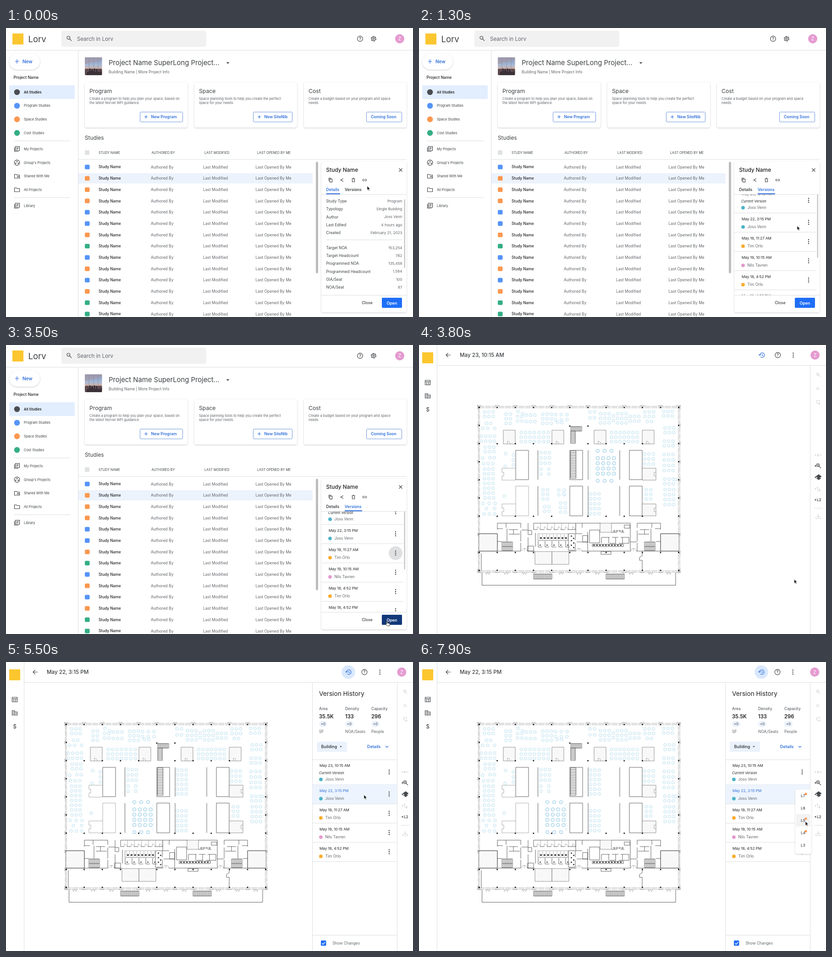
These frames come from a looping animation (888x631 px, 8 s). An HTML page:

```html
<!DOCTYPE html>
<html lang="en">
<head>
<meta charset="utf-8">
<title>Version history</title>
<style>
  html, body { margin: 0; width: 888px; height: 631px; overflow: hidden; background: #fff; }
  svg { display: block; }
  text { font-family: Inter, Roboto, sans-serif; fill: #3c4043; white-space: pre; }
  .m { font-weight: 500; }
  .b { font-weight: 600; }
  .k { fill: #202124; }
  .g { fill: #5f6368; }
  .blue { fill: #2f6fdc; }
  .white { fill: #fff; }
  .mid { text-anchor: middle; }
  .end { text-anchor: end; }
  .it { font-style: italic; }
  .ic { fill: none; stroke: #44474a; stroke-width: 1.2; }
  .pale { stroke: #d3d5d7; }
  .ib { stroke: #2f6fdc; }
  .ln { fill: none; stroke: #dcdee0; }
  .lift { filter: drop-shadow(0 1px 1.5px rgba(60, 64, 67, .28)); }
  .wall { fill: none; stroke: #3a3a3a; stroke-width: .8; }
  .thin { fill: none; stroke: #777; stroke-width: .6; }
  .room { fill: #f8f8f8; stroke: #666; stroke-width: .7; }
  .desk { fill: #f4fafd; stroke: #acd8ea; stroke-width: .7; }
  .moved { fill: #f0f8fc; stroke: #80bfdd; stroke-width: .85; }
  .ghost { fill: none; stroke: #c6e2ef; stroke-width: .7; }
  .cursor { animation: travel 8s ease-in-out infinite; }
  .scroll { animation: scroll 8s linear infinite; }
  .nudge { animation: nudge 8s step-end infinite; }
  @keyframes travel {
    0%, 1% { transform: translate(788px, 345px); }
    4%, 7% { transform: translate(760px, 353px); }
    12%, 17% { transform: translate(825px, 432px); }
    21%, 24% { transform: translate(849px, 452px); }
    27.2%, 35% { transform: translate(809px, 459px); }
    41.5%, 46% { transform: translate(830px, 603px); }
    51.5%, 57% { transform: translate(757px, 20px); }
    66.5%, 83.5% { transform: translate(781px, 290px); }
    91.5%, 94% { transform: translate(867px, 337px); }
    98.5%, 100% { transform: translate(843px, 348px); }
  }
  @keyframes scroll {
    0%, 12.5% { transform: translateY(0); }
    16.25% { transform: translateY(-22px); }
    18.75%, 100% { transform: translateY(-34px); }
  }
  @keyframes nudge {
    0% { transform: translateX(.8px); }
    68.75% { transform: none; }
  }
</style>
</head>
<body>
<script>
let rules = '';

// Visible from the 1st to the 2nd time, 3rd to 4th, and so on (ms).
function span(...times) {
  const id = 's' + times.join('_');
  const keys = times.map((ms, i) => `${ms / 80}%{opacity:${1 - i % 2}}`).join('');
  rules += `@keyframes ${id}{${times[0] ? '0%{opacity:0}' : ''}${keys}}`;
  return `style="animation:${id} 8s step-end infinite"`;
}

const loop = (n, fn) => Array.from({ length: n }, (_, i) => fn(i)).join('');
const text = (x, y, size, str, cls = '') =>
  `<text x="${x}" y="${y + size * .36}" font-size="${size}" class="${cls}">${str}</text>`;
const rect = (x, y, w, h, fill, rx = 0, more = '') =>
  `<rect x="${x}" y="${y}" width="${w}" height="${h}" rx="${rx}" fill="${fill}" ${more}/>`;
const dot = (x, y, r, fill) => `<circle cx="${x}" cy="${y}" r="${r}" fill="${fill}"/>`;
const path = (d, cls, more = '') => `<path d="${d}" class="${cls}" ${more}/>`;
const group = (body, attrs = '') => `<g ${attrs}>${body}</g>`;
const icon = (x, y, d, cls = '') => path(d, 'ic ' + cls, `transform="translate(${x} ${y})"`);
const kebab = (x, y) => loop(3, i => dot(x, y - 4.2 + i * 4.2, 1.25, '#44474a'));
const caret = (x, y, s = 3.5) => `<path d="M${x - s} ${y - s / 2}h${2 * s}l${-s} ${s}z" fill="#44474a"/>`;
const ring = r => `M${-r} 0a${r} ${r} 0 1 0 ${2 * r} 0a${r} ${r} 0 1 0 ${-2 * r} 0`;

const plus = 'M-4.5 0h9M0-4.5v9';
const lens = 'M1.2 1.2L5 5M-5-1.7a3.3 3.3 0 1 0 6.6 0a3.3 3.3 0 1 0-6.6 0';
const books = 'M-3.5-5.5h9v9h-9zM-5.5-3.5v9h9M-1.5-3h5M-1.5-1h5M-1.5 1h3';
const folder = 'M-5.5-4h4l1.5 1.5h5.5v7h-11z';
const yellow = '#fcc62f', pink = '#e59ad0', blue = '#5594f9', orange = '#fb9850', green = '#34ae84';
const help = (x, y) => icon(x, y, ring(5.8)) + text(x, y, 8.5, '?', 'mid b');
const avatar = (x, y) => dot(x, y, 10, pink) + text(x, y, 11, 'Z', 'mid white');

const joss = ['Joss Venn', '#4db3c9'], tim = ['Tim Orlo', '#fbab2c'], nils = ['Nils Tavren', pink];
const versions = [
  ['May 23, 10:15 AM', joss], ['May 22, 3:15 PM', joss], ['May 19, 11:27 AM', tim],
  ['May 19, 10:15 AM', nils], ['May 18, 4:52 PM', tim], ['May 18, 4:52 PM', tim]
];

function versionList(x, top, left, right, menuX, count, picked) {
  return loop(count, i => {
    const [date, [name, color]] = versions[i];
    const y = top + i * 42 + (i ? 12.3 : 0), extra = i ? 0 : 12.3, on = i === picked;
    return (on ? rect(left, y, right - left, 42 + extra, '#edf4fd') : '') +
      text(x, y + 13, 8.1, date, on ? 'blue' : 'k') +
      (i ? '' : text(x - 1, y + 29, 7.4, 'Current Version', on ? 'it blue' : 'it k')) +
      dot(x + 3, y + 30.5 + extra, 3.9, color) +
      text(x + 12.5, y + 30.5 + extra, 8.4, name, 'g') + kebab(menuX, y + 20.5 + extra / 2) +
      path(`M${left} ${y + 42 + extra}H${right}`, 'ln');
  });
}

function sidebar() {
  const studies = [['All', '#4a4d52'], ['Program', blue], ['Space', orange], ['Cost', green]];
  const links = [
    ['My Projects', 264, books],
    ["Group's Projects", 294, ring(5.8) + 'M-3.5 1.6a.8 .8 0 1 0 1.6 0a.8 .8 0 1 0-1.6 0M2 1.6a.8 .8 0 1 0 1.6 0a.8 .8 0 1 0-1.6 0M-.8-2.4a.8 .8 0 1 0 1.6 0a.8 .8 0 1 0-1.6 0'],
    ['Shared With Me', 323.5, folder + 'M0 2.7q.5-1.5 2.3-1.5t2.3 1.5M1.4-.4h1.8'],
    ['All Projects', 353, folder], ['Library', 388, books]
  ];
  return group(rect(7, 56, 67, 35, '#fff', 17.5), 'class="lift"') + icon(24, 73, plus, 'ib') +
    text(36, 73, 9.9, 'New', 'b blue') + text(16.5, 108, 8.5, 'Project Name', 'm k') +
    rect(7, 125, 143, 30, '#e2eefd', 2) +
    loop(4, i => dot(24, 140 + i * 29.7, 6.3, studies[i][1]) +
      text(39, 140 + i * 29.7, i ? 7.4 : 7.5, studies[i][0] + ' Studies', i ? '' : 'b k')) +
    links.map(([label, y, d]) => icon(24, y, d) + text(39, y, 7.4, label)).join('') +
    path('M17 246.5H140.5M17 370.5H140.5M157.5 48V631', 'ln');
}

function card(x, title, line1, line2, label, w, hasPlus) {
  const bx = x + 214 - w;
  return group(rect(x, 118.5, 224, 99, '#fff', 4), 'class="lift"') + text(x + 10, 138, 12.2, title) +
    text(x + 10, 154, 7.42, line1, 'g') + text(x + 10, 163.5, 7.42, line2, 'g') +
    rect(bx + .5, 183.5, w - 1, 21.5, '#fff', 2, 'stroke="#6d97dc"') +
    (hasPlus ? icon(bx + 13.5, 194, 'M-3.5 0h7M0-3.5v7', 'ib') : '') +
    text(bx + (hasPlus ? 24.5 : 10), 194.3, 8.6, label, 'b blue');
}

function photo() {
  return rect(172, 64, 37.5, 39, 'url(#dusk)', 2) + rect(172, 89, 37.5, 14, '#5d4a50', 2) +
    path('M172 64h37.5v5L172 79z', '', 'fill="#a99aa8" opacity=".7"') +
    path('M181 64v27M191 64v27M201 64v27', '', 'stroke="#8891a8" stroke-width=".8"') +
    path('M176 97q8-5 16-2t17-1v9h-33z', '', 'fill="#3c3138"') +
    loop(4, i => rect(182 + i * 5, 88 + i % 2 * 2, 2, 7, '#2b2830', 1));
}

function table() {
  const kinds = 'booobbogbobogg', fills = { b: blue, o: orange, g: green };
  const heads = [[202, 'STUDY NAME'], [317.5, 'AUTHORED BY'], [433, 'LAST MODIFIED'], [548, 'LAST OPENED BY ME']];
  return text(172, 240, 11.8, 'Studies') + rect(172, 267, 10, 10, '#e0e1e3', 2) +
    heads.map(([x, s]) => text(x, 272, 7.1, s)).join('') +
    path('M158 287H874', 'ln') + rect(158, 317, 511, 22.5, '#edf3fc') +
    loop(14, i => {
      const y = 303.5 + i * 24.69;
      return rect(172, y - 5, 10.5, 10, fills[kinds[i]], 2.5) + text(202, y, 8.3, 'Study Name', 'm k') +
        text(316, y, 8.45, 'Authored By', 'g') + text(430, y, 8.45, 'Last Modified', 'g') +
        text(544.5, y, 8.45, 'Last Opened By Me', 'g');
    }) + rect(676, 292, 5, 243.5, '#bdbdbd', 2.5);
}

function studyPanel() {
  const rows = [
    ['Study Type', 'Program'], ['Typology', 'Single Building'], ['Author', joss[0]],
    ['Last Edited', '4 hours ago'], ['Created', 'February 21, 2023'],
    ['Target NOA', '153,254'], ['Target Headcount', '782'], ['Programmed NOA', '135,458'],
    ['Programmed Headcount', '1,584'], ['GIA/Seat', '100'], ['NOA/Seat', '87']
  ];
  const bar = rect(868.5, 374, 2.5, 150, '#c6c8ca', 1.2);
  const tab = (x, w, s, times, off) =>
    group(text(x, 353, 8.7, s, 'b blue') + rect(x, 361, w, 2.2, '#2f6fdc'), span(...times)) +
    group(text(x, 353, 8.7, s, 'b'), span(...off));
  const details = rows.map(([a, b], i) => {
    const y = 378 + i * 17.25 + (i > 4 ? 15.5 : 0);
    return text(698.5, y, 8.4, a) + text(864.5, y, 8.1, b, 'end g');
  }).join('') + path('M698 462.5H865', 'ln') + bar;
  const list = group(dot(850, 454.5, 15, '#dfe0e2'), span(1650, 3600)) +
    group(versionList(704, 371.5, 688, 867, 850, 6, -1) + bar, 'class="scroll"');
  return group(rect(688, 292, 186, 329, '#fff', 4), 'class="lift"') +
    text(698.5, 310, 11.9, 'Study Name', 'm k') + icon(861, 310, 'M-3.5-3.5l7 7M3.5-3.5l-7 7') +
    icon(708, 332, 'M-1.5-2.2h5v6.5h-5zM-3.5 2v-6.2h5') +
    icon(733, 332, 'M2.5-3L-2.7 0L2.5 3M2-3h1M2 3h1M-3 0h.6') +
    icon(758, 332, 'M-2.5-2v6h5v-6M-3.5-3.2h7M-1-4.2h2') +
    icon(782.5, 332, 'M-1-2h-1a2 2 0 0 0 0 4h1M1-2h1a2 2 0 0 1 0 4h-1M-1.5 0h3') +
    tab(698.5, 30.5, 'Details', [0, 400], [400, 3600]) + tab(739, 38, 'Versions', [400, 3600], [0, 400]) +
    path('M688 363.5H874M688 583.5H874', 'ln') +
    group(group(details, span(0, 400)) + group(list, span(400, 3600)), 'clip-path="url(#body)"') +
    text(788, 600.3, 8.7, 'Close', 'mid m') + rect(820, 589, 44, 22, '#1f6ef7', 2) +
    group(rect(820, 589, 44, 22, '#12387a', 2), span(3300, 3600)) + text(842, 600.3, 8.9, 'Open', 'mid b white');
}

function contextMenu() {
  const items = ['Restore this Version', 'Name this Version', 'Make a Copy of this Version'];
  return group(
    group(rect(681, 420, 160, 99, '#fff', 4), 'class="lift"') +
    group(rect(681, 454, 160, 30, '#f4f4f5'), span(2000, 2800)) +
    items.map((s, i) => text(691.5, 440 + i * 29.6, 8.33, s, 'g')).join(''), span(1800, 2800));
}

function studiesScreen() {
  return rect(14, 12, 24, 24, yellow) + text(48.5, 24, 18.5, 'Lorv') +
    rect(121, 6, 316, 35, '#f1f1f2', 4) + icon(138, 23, lens) + text(155, 24, 11.55, 'Search in Lorv', 'g') +
    help(772.5, 23.5) + icon(802, 23.5, ring(1.8) + ring(4.4)) +
    `<circle cx="802" cy="23.5" r="5.4" class="ic" stroke-dasharray="2.6 3.05"/>` + avatar(859, 23.5) +
    path('M0 48.5H888', 'ln') + sidebar() + photo() +
    text(224, 76, 14.8, 'Project Name SuperLong Project...') + caret(484, 76.5) +
    text(224, 96, 8.36, 'Building Name | More Project Info', 'g') +
    card(172, 'Program', 'Create a program to help you plan your space, based on', 'the latest Norvel WPI guidance.', 'New Program', 94, true) +
    card(411, 'Space', 'Space planning tools to help you create the perfect', 'space for your needs.', 'New SiteNib', 86, true) +
    card(650, 'Cost', 'Create a budget based on your program and space', 'needs.', 'Coming Soon', 78, false) +
    table() + studyPanel() + contextMenu();
}

const desks = (x, y, cols, rows, dx = 9.4, dy = 10, r = 3.3, cls = 'desk') =>
  loop(cols * rows, i => `<circle cx="${x + i % cols * dx}" cy="${y + Math.floor(i / cols) * dy}" r="${r}" class="${cls}"/>`);

// A block of moved seats with a row of three above and below.
const movedBlock = (x, y) => desks(x, y, 4, 4, 11.8, 11.3, 3.8, 'moved') +
  desks(x, y - 16, 3, 2, 15, 65.5, 3.6, 'moved');
const halves = (x, y, n) => loop(n, i => path(`M${x} ${y + i * 10.4}a3.3 3.3 0 0 0 0 6.6`, 'ghost'));

function seats() {
  const west = desks(143, 146, 3, 2) + desks(147, 171, 2, 1) + desks(139, 182, 2, 1, 11) + desks(165, 182, 1, 1) +
    desks(136, 199, 4, 2, 9.6, 11) + desks(144.5, 223, 3, 2) + desks(139, 247, 1, 1) + desks(155, 246, 2, 1) +
    desks(141, 259, 3, 1, 10) + desks(143, 271, 3, 6, 9.3, 10.4) + desks(144, 334, 3, 1) +
    desks(140, 346, 3, 1, 13) + desks(147, 357, 2, 1, 18) + desks(142, 369, 3, 1, 11.5);
  const north = desks(190, 151, 2, 3) + desks(216, 145, 1, 1) + desks(215, 156, 2, 2) + desks(226, 150, 1, 1) +
    desks(234, 153, 3, 2, 9.4, 14) + desks(270, 151, 3, 3) + desks(298, 152, 3, 2, 12.5, 11) + desks(302, 169, 2, 1) +
    desks(223, 191, 4, 3, 9.6) + desks(262, 191, 3, 3, 10) +
    desks(373, 146, 2, 2, 10, 13) + desks(396, 150, 3, 3) + desks(424, 155, 1, 2) + desks(433, 150, 3, 3) +
    desks(461, 156, 3, 2) + desks(493, 146, 3, 2) + desks(498, 167, 2, 1) +
    desks(420, 191, 3, 3) + desks(448, 191, 4, 3);
  const east = desks(534, 145, 3, 2) + desks(537, 181, 3, 2) + desks(535, 210, 3, 2, 9.6) + desks(535, 239, 3, 2, 9.6, 12) +
    desks(535, 263, 3, 2, 9.6, 11) + desks(536, 293, 3, 2) + desks(560, 294, 1, 1) + desks(537, 316, 3, 4, 9.3, 10.8);
  const core = desks(189, 237, 1, 1) + desks(206, 240, 1, 3, 0, 11) + desks(188, 265, 1, 1) + desks(186, 330, 1, 1) +
    desks(266, 235, 3, 3, 9.3, 11.5) + desks(266, 271, 2, 2, 17, 11) + desks(492, 238, 3, 3, 9.6, 11) +
    desks(496, 316, 2, 3, 9.6) + desks(374, 325, 3, 5, 9.4, 10.8);
  return west + north + east + core;
}

const seatsBefore = () => movedBlock(390, 247) + halves(375, 233, 6) +
  desks(270.5, 316, 2, 3, 10) + desks(274, 353, 2, 2) + desks(305, 317, 2, 2, 12, 10) + desks(316, 325, 1, 1) +
  desks(309, 345, 2, 3, 10);
const seatsAfter = () => movedBlock(280, 322) + halves(323, 310, 6) + desks(374, 236, 3, 6, 9.6, 10.4);

const stairs = (x, y, w, h, n, upright) => path(`M${x} ${y}h${w}v${h}h${-w}z` +
  loop(n, i => upright ? `M${x} ${y + (i + 1) * h / (n + 1)}h${w}` : `M${x + (i + 1) * w / (n + 1)} ${y}v${h}`), 'wall');

function floor() {
  const cx = i => 131 + i * 39.6, cy = i => 136 + i * 39.6;
  const post = (x, y) => rect(x - 1.4, y - 1.4, 2.8, 2.8, '#222');
  const inner = [1, 2, 3, 4, 6, 7, 8, 9];
  const box = (x, y, w, h, cls) => path(`M${x} ${y}h${w}v${h}h${-w}z`, cls);
  const edge = loop(12, i => post(cx(i), 136.5) + post(cx(i), 492) + post(cx(i), 453) +
      path(`M${cx(i) - 4} 134v-2h8v2M${cx(i) - 4} 495v2h8v-2`, 'thin')) +
    loop(10, i => post(131.5, cy(i)) + post(566.5, cy(i)) +
      path(`M129.5 ${cy(i) - 3}h-1.5v6h1.5M568.5 ${cy(i) - 3}h1.5v6h-1.5`, 'thin'));
  const cores = [211, 329, 459].map(x => box(x, 230, 28, 64, 'wall') +
    box(x, 308, 28, 65, x === 211 ? 'thin' : 'wall')).join('');
  const cabins = [184, 290, 382, 487].map(x => box(x, 186, 26, 30, 'room') +
    path(`M${x + 9} 216v-6a6 6 0 0 1 6 6`, 'thin')).join('');
  const annex = [269, 347].map(y => box(487, y, 30, 26, 'room') +
    path(`M211 ${y}h-30v9h4v8h-4v9h30M517 ${y + 9}h-4v8h4`, 'thin')).join('');
  const shell = 'M130 134H569M130 137H569M129.5 134V497M132 137V497M566 137V497M569 134V497M130 493H569M130 496H569';
  const suites = 'M171 403v-14h51v10M190 389v10M171 401h12M192 401v28M196 403h20M196 413h24M206 403v10M222 405v24M171 429h10' +
    'M527 403v-14h-51v10M508 389v10M527 401h-12M506 401v28M502 403h-20M502 413h-24M492 403v10M476 405v24M527 429h-10';
  const service = 'M131 450H222M236 450H253M327 450H343M355 450H462M474 450H567M238 389v15h-14M238 404v10M238 420v30' +
    'M250 403v-14h146M250 403h8m6 0h9m6 0h9m6 0h9m6 0h9m6 0h18v-14M356 389v10M342 403v9h14M368 408v24M357 416h11v14h-11z' +
    'M372 404h22v28h-22zM420 389h41v19M448 393h12v7h-12zM461 408v41M420 409h12M440 409h8M398 433v-13h18m5 0h14m5 0h18v13h-22m-6 0h-14M414 420v13M429 420v13M444 420v13' +
    'M326 412h15v14M341 432v16h-15v-36M237 439h13v11h-13zM238 405h8v9h-8M254 410v30M344 430h24v20M461 430h14M476 432v18M222 432v18' +
    'M136 455v38M487 451v9l-6 4v6h6v22M397 451h22v6h-22z';
  const fixtures = loop(8, i => path(`M${262 + i * 7.8} 413v11`, 'thin') + rect(264 + i * 7.8, 420, 4, 3, '#333')) +
    loop(5, i => path(`M${260 + i * 15} 428v13h9`, 'wall') + rect(263 + i * 15, 436, 3, 2, '#444')) +
    loop(6, i => rect(331 + i % 2 * 5, 416 + i * 5, 3, 2.5, '#444')) +
    path('M259 412h66v14h-66zM259 427h66', 'thin') + path('M378 440v-5h68v5z', 'wall') +
    loop(10, i => rect(380 + i * 6.5, 436, 3.6, 2.4, '#333')) + loop(4, i => desks(426 + i * 6, 406, 1, 1, 0, 0, 1.6, 'wall'));
  const doors = [150, 190, 230, 310, 349, 389, 463, 505, 545].map(x => path(`M${x - 5} 496l2 5 3-5 3 5 2-5`, 'thin')).join('') +
    [230, 349, 468].map(x => path(`M${x - 6} 450a6 6 0 0 1 6-6a6 6 0 0 1 6 6M${x} 444v6`, 'thin')).join('') +
    loop(6, i => path(`M${258 + i * 15.3} 403v-6a6 6 0 0 1 6 6M${265.3 + i * 15.3} 389v14`, 'thin'));
  return path(shell, 'thin', 'stroke-dasharray="13 1.5"') + edge + cabins + cores + annex +
    post(cx(5), 177) + post(cx(6), 177) + inner.map(i => post(cx(i), 215.5) + post(cx(i), 374)).join('') +
    [259.5, 369, 438].map(x => path(`M${x} 230v64M${x} 308v65`, 'wall')).join('') +
    stairs(331, 178, 24, 10, 8) + stairs(331, 188, 10, 27, 8, true) + stairs(330.5, 231, 12, 60, 16, true) +
    box(131, 412, 40, 38, 'room') + box(527, 412, 40, 38, 'room') + box(395, 389, 25, 20, 'room') +
    box(253, 451, 74, 28, 'room') + path('M290 451v28M131 412h40v38M527 412h40M527 412v38', 'wall') +
    path(suites + service, 'wall') + fixtures + doors +
    stairs(181, 430, 23, 19, 7) + stairs(492, 430, 23, 19, 7) + path('M181 440h23M492 440h23', 'wall', 'stroke-width="2"') +
    path('M137.5 497V524.5H560V497', 'wall') + stairs(250, 500, 40, 11, 14) + stairs(408, 500, 40, 11, 14);
}

function stats() {
  return [['Area', '35.5K', 'SF'], ['Density', '133', 'NOA/Seats'], ['Capacity', '296', 'People']].map(([a, b, c], i) => {
    const x = 683 + i * 57;
    return text(x, 102, 8.4, a, 'm g') + text(x, 118.5, 11.2, b, 'b k') +
      rect(x, 129, 18, 13, '#ebf2fd', 6.5) + text(x + 9, 135.5, 8, '+0', 'mid') + text(x, 151.5, 8.5, c, 'g');
  }).join('');
}

function historyPanel() {
  const list = picked => versionList(684, 213.5, 668.5, 853, 836, 5, picked);
  return group(text(683, 69.5, 13.7, 'Version History', 'k') + stats() +
    rect(678, 174, 66, 22, '#ebf2fc', 2) + text(687.5, 185, 8.9, 'Building', 'b') + caret(730.5, 185, 2.6) +
    text(788, 185, 8.9, 'Details', 'b blue') + icon(831, 185, 'M-3-1.5l3 3 3-3', 'ib') +
    path('M668 213.5H853M668 596.5H853M668.5 45V631', 'ln') +
    group(list(0), span(0, 5500)) + group(list(1), span(5500, 8000)) +
    rect(687, 608, 11.5, 11.5, '#1f6ef7', 1.5) + path('M689.5 614l2.4 2.4 4.5-5', '', 'fill="none" stroke="#fff" stroke-width="1.4"') +
    text(712.5, 614, 8.4, 'Show Changes', 'g'), span(4200, 8000));
}

function tools() {
  const arrow = (y, fill) => path(`M866 ${y - 2.2}v4.4l-3-2.2z`, '', `fill="${fill}"`);
  return path('M853.5 45V631M862 356.5H881', 'ln') +
    icon(871, 65, 'M.5 .5L4 4M-3.5-1.3a2.4 2.4 0 1 0 4.8 0a2.4 2.4 0 1 0-4.8 0', 'pale') +
    icon(871, 95, 'M-3 3v-5M0 3v-7M3 3v-2', 'pale') + icon(871, 125, 'M3-1v-3h-6v6h3M0 3h5M2.5 .5v5', 'pale') +
    arrow(240, '#d3d5d7') + icon(873, 240, 'M-4-2v4h4M-4 2q4-6 9 0', 'pale') +
    arrow(264, '#44474a') + icon(872, 264, lens + 'M-3.2-1.7h3M-1.7-3.2v3') +
    arrow(289, '#44474a') + path('M872 283l5.5 4-5.5 4-5.5-4zM867 290.5l5 3.6 5-3.6', 'ic', 'style="fill:#44474a"') +
    arrow(314, '#d3d5d7') + icon(872, 314, 'M-2 4v-8l-2 2M2-1v6l2-2M2 5l-2-2', 'pale') +
    arrow(338, '#44474a') + text(868, 338.3, 8, 'L2', 'b') +
    icon(871, 374, 'M0-5v7M-2.5-.5L0 2l2.5-2.5M-5 1v4h10v-4', 'pale');
}

function levelMenu() {
  return group(group(rect(821, 278, 35, 141, '#fff', 4), 'class="lift"') +
    group(rect(823, 332, 31, 27, '#f2f2f3'), span(7600, 8000)) +
    [7, 6, 5, 4, 3].map((n, i) => text(833, 292 + i * 27.1, 8.2, 'L' + n, 'k')).join('') +
    [288, 342, 369.5].map(y => dot(844, y, 2.6, orange)).join(''), span(7400, 8000));
}

function planScreen() {
  const clock = 'M-4.6 0a5 5 0 1 1 1.5 3.6M-6.8-1.5l2.2 2.2 2.2-2.2M.4-2.6v3l2.2 1.4';
  return rect(0, 0, 888, 631, '#fff') + rect(7, 16, 24, 24, yellow) +
    icon(19, 82, 'M-5.5-5h11v10h-11zM-5.5-2h11M-2-2v7M2-2v7') +
    icon(19, 111, 'M-5.5-5h5.5v10h-5.5zM0-2h5.5v7H0M-4-2.5h2.5M-4 0h2.5M-4 2.5h2.5M2 .5h2M2 2.5h2') +
    text(19, 141, 12, '$', 'mid') + path('M39.5 0V631M40 44.5H888', 'ln') +
    icon(64, 22, 'M5 0h-10M-.5-4.5L-5 0l4.5 4.5') +
    group(group(dot(747, 22, 14.7, '#d9e8fd'), span(4000, 8000)) + icon(747.5, 22, clock, 'ib') +
      help(782, 22) + kebab(815.7, 22) + avatar(863.3, 22), 'class="nudge"') +
    floor() + seats() +
    group(text(89, 22, 11.6, 'May 23, 10:15 AM', 'm') + seatsBefore(), span(0, 5500)) +
    group(text(89, 22, 11.6, 'May 22, 3:15 PM', 'm') + seatsAfter(), span(5500, 8000)) +
    historyPanel() + tools() + levelMenu();
}

function cursor() {
  const arrow = path('M0 0v9.2l2.2-2 1.5 3.3 1.5-.7-1.5-3.2h2.9z', '', 'fill="#111" stroke="#fff" stroke-width=".7"');
  const hand = path('M.2 1.2a1 1 0 0 1 2 0v2.9l4.4 1q1 .3 .9 1.4l-.7 3.7H1.6L-1.6 6.6q-.2-1.3 1.8-.3z', '',
    'fill="#fff" stroke="#222" stroke-width=".9"');
  const turns = [300, 600, 1600, 2850, 3250, 3650, 3950, 4600];
  return group(group(arrow, span(0, ...turns, 8000)) + group(hand, span(...turns)), 'class="cursor"');
}

const scenes = group(studiesScreen(), span(0, 3600)) + group(planScreen(), span(3600, 8000)) + cursor();
document.body.innerHTML = `<style>${rules}</style>
<svg width="888" height="631" viewBox="0 0 888 631">
  <defs>
    <clipPath id="body"><rect x="688" y="364" width="186" height="219"/></clipPath>
    <linearGradient id="dusk" x2="0" y2="1">
      <stop stop-color="#7f93b8"/><stop offset=".45" stop-color="#a9bbd6"/><stop offset=".7" stop-color="#e0a98c"/>
    </linearGradient>
  </defs>${scenes}</svg>`;
</script>
</body>
</html>
```
